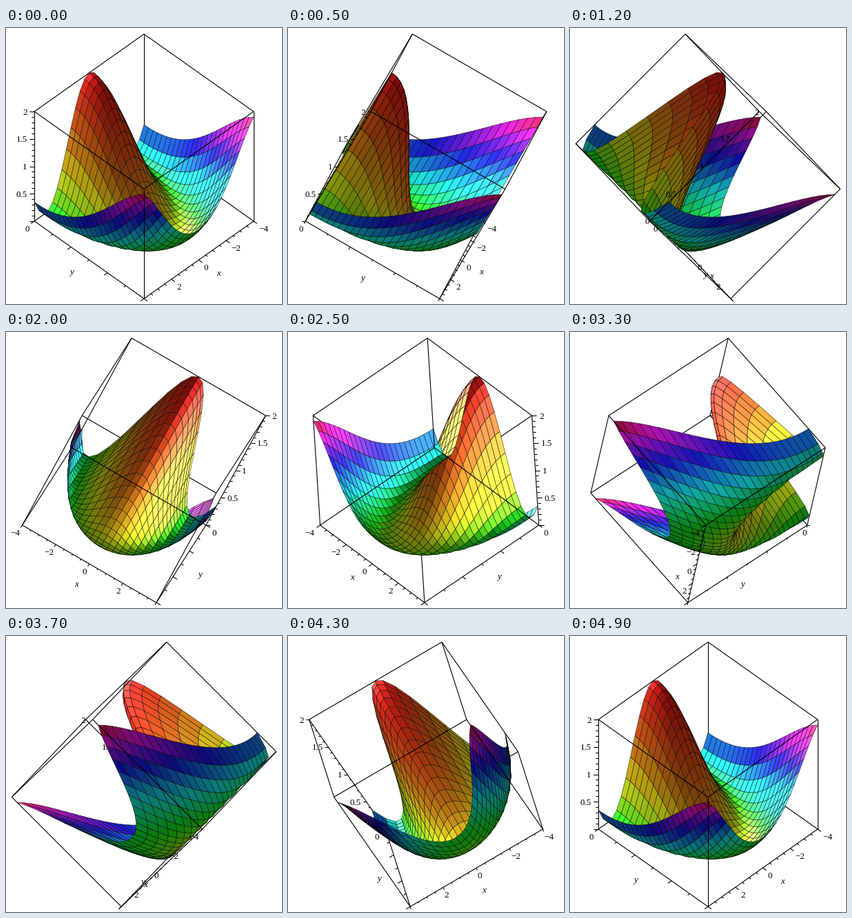
A matplotlib script that plays this animation: 400 by 400 pixels, repeating every 5000 ms.

```python
import itertools

import matplotlib.pyplot as plt
import numpy as np
from matplotlib.animation import FuncAnimation
from matplotlib.collections import LineCollection, PolyCollection
from matplotlib.colors import hsv_to_rgb

SIZE, DPI = 400, 100
FRAMES, INTERVAL = 50, 100
HALF = 112.3                      # half the side of the box in pixels
CENTER = np.array([200, 200.5])
CELLS = 24
R = np.sqrt(0.5)

# box axes in view space: right, up, towards the viewer
AXES = np.array([[-R, -0.5, 0.5], [R, -0.5, 0.5], [0, R, R]])
LIGHT = np.array([-0.65, 0.70, 0.30])
OUT_X, OUT_Y, OUT_Z = AXES[1], AXES[0], np.array([-1.0, 0, 0])


def to_box(x, y, z):
    return np.stack([x / 4, y / 1.5 - 1, z - 1], axis=-1)


def to_view(x, y, z):
    return to_box(x, y, z) @ AXES * HALF


def turn(points, angle):
    """Rotate view-space points about the vertical screen axis."""
    c, s = np.cos(angle), np.sin(angle)
    x, y, d = np.moveaxis(np.asarray(points, float), -1, 0)
    return np.stack([x * c + d * s, y, d * c - x * s], axis=-1)


def to_screen(points):
    return CENTER + points[..., :2] * [1, -1]


def radius(x, y):
    return np.sqrt(x**2 + 2 * y**2)


def build_surface():
    x, y = np.meshgrid(np.linspace(-4, 4, CELLS + 1),
                       np.linspace(0, 3, CELLS + 1), indexing="ij")
    p = to_view(x, y, 1 + np.cos(radius(x, y)))
    quads = np.stack([p[:-1, :-1], p[1:, :-1], p[1:, 1:], p[:-1, 1:]], axis=2)
    xm = (x[:-1, :-1] + x[1:, 1:]) / 2
    ym = (y[:-1, :-1] + y[1:, 1:]) / 2
    r = radius(xm, ym)
    slope = np.sin(r) / r
    normal = np.stack([4 * slope * xm, 3 * slope * ym, np.ones_like(r)], -1) @ AXES
    normal /= np.linalg.norm(normal, axis=-1, keepdims=True)
    hue = (xm**2 + ym**2) / 25
    full = np.ones_like(hue)
    rgb = hsv_to_rgb(np.stack([hue, 0.92 * full, full], -1))
    return quads.reshape(-1, 4, 3), normal.reshape(-1, 3), rgb.reshape(-1, 3)


def build_box():
    edges = []
    for axis in range(3):
        b, c = [k for k in range(3) if k != axis]
        for sb, sc in itertools.product((-1, 1), repeat=2):
            ends = np.zeros((2, 3))
            ends[:, axis] = -1, 1
            ends[:, b], ends[:, c] = sb, sc
            edges.append((ends @ AXES * HALF, (sb * AXES[b], sc * AXES[c])))
    return edges


def build_ticks():
    ticks = []

    def add(point, outward, major):
        start = to_view(*np.array(point, float))
        ticks.append((np.array([start, start + outward * (7 if major else 4)]), outward))

    for k in range(17):
        add((k / 2 - 4, 3, 0), OUT_X, k % 4 == 0)
    for k in range(7):
        add((4, k / 2, 0), OUT_Y, k % 2 == 0)
    for k in range(21):
        add((4, 0, k / 10), OUT_Z, k % 5 == 0)
    return ticks


QUADS, NORMALS, COLORS = build_surface()
BOX = build_box()
TICKS = build_ticks()

fig = plt.figure(figsize=(SIZE / DPI, SIZE / DPI), dpi=DPI, facecolor="white")
ax = fig.add_axes([0, 0, 1, 1])


def draw_surface(angle):
    quads, normals = turn(QUADS, angle), turn(NORMALS, angle)
    normals *= np.where(normals[:, 2:] < 0, -1, 1)
    lit = np.clip(normals @ LIGHT, 0, 1)[:, None]
    colors = np.clip(COLORS * (0.48 + 0.65 * lit) + 0.45 * lit**3, 0, 1)
    order = np.argsort(quads[..., 2].mean(axis=1))
    ax.add_collection(PolyCollection(
        to_screen(quads[order]), facecolors=colors[order],
        edgecolors=(0, 0, 0, 0.65), linewidths=0.5, zorder=2))


def draw_lines(angle):
    layers = {1: [], 3: []}
    for ends, faces in BOX:
        front = any(turn(n, angle)[2] > 0 for n in faces)
        layers[3 if front else 1].append(to_screen(turn(ends, angle)))
    for ends, outward in TICKS:
        front = turn(outward, angle)[2] > 0
        layers[3 if front else 1].append(to_screen(turn(ends, angle)))
    for zorder, lines in layers.items():
        ax.add_collection(LineCollection(lines, colors="black", linewidths=0.8,
                                         zorder=zorder))


def put_text(pos, text, outward, **style):
    ax.text(*pos, text, family="Liberation Serif", fontsize=9.4, color="black",
            zorder=4 if outward[2] > 0 else 1, **style)


def tick_label(angle, point, text, outward):
    out = turn(outward, angle)
    x, y = to_screen(turn(to_view(*np.array(point, float)), angle) + 10.5 * out)
    y += 5 if out[1] < -0.1 else 0
    put_text((x, y), text, out, ha="left" if out[0] > 0 else "right",
             va="center_baseline")


def axis_name(angle, point, text, outward, distance):
    out = turn(outward, angle)
    step = out[:2] / np.hypot(*out[:2]) * [1, -1]
    pos = to_screen(turn(to_view(*np.array(point, float)), angle)) + step * distance
    put_text(pos, text, out, style="italic", ha="center", va="center")


def draw(frame):
    angle = 2 * np.pi * frame / (FRAMES - 1)
    ax.cla()
    ax.set(xlim=(0, SIZE), ylim=(SIZE, 0))
    ax.axis("off")
    draw_surface(angle)
    draw_lines(angle)
    for x in (-4, -2, 0, 2):
        tick_label(angle, (x, 3, 0), str(x).replace("-", "\u2212"), OUT_X)
    tick_label(angle, (4, 0, 0), "0", OUT_Y)
    for z in (0, 0.5, 1, 1.5, 2):
        # the lowest label only fits when it is clear of the neighbouring zero
        if z or abs(np.cos(angle)) < 0.3:
            tick_label(angle, (4, 0, z), f"{z:g}", OUT_Z)
    axis_name(angle, (0, 3, 0), "x", OUT_X, 35)
    axis_name(angle, (4, 1.5, 0), "y", OUT_Y, 31)
    return []


anim = FuncAnimation(fig, draw, frames=FRAMES, interval=INTERVAL,
                     init_func=lambda: [], repeat=True, repeat_delay=0)
plt.show()
```
